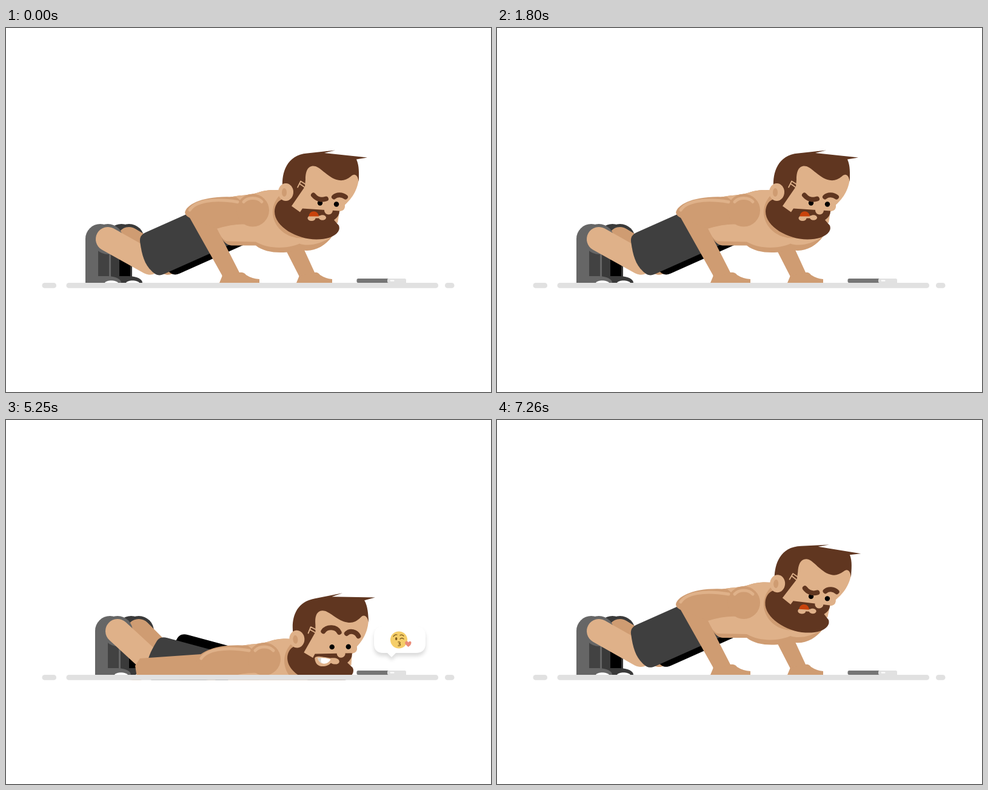
An HTML page with a canvas that plays this animation: 800 by 600 pixels, repeating every 7.29 s.

```html
<!DOCTYPE html>
<html lang="en">
<head>
<meta charset="utf-8">
<title>Push-ups</title>
<style>
html, body { margin: 0; width: 100%; height: 100%; overflow: hidden; background: #fff; }
canvas { display: block; width: 800px; height: 600px; }
</style>
</head>
<body>
<canvas id="stage" width="800" height="600"></canvas>
<script>
const c = document.getElementById('stage').getContext('2d');
const LOOP = 7290, STEP = 30;
const SKIN = '#dfb189', SHADE = '#cf9c72', HAIR = '#603620', GREY = '#e1e1e1';

const lerp = (a, b, k) => a + (b - a) * k;
const wave = x => (1 - Math.cos(Math.PI * x)) / 2;
const ramp = (t, a, b) => wave(Math.min(1, Math.max(0, (t - a) / (b - a))));
const pulse = (t, a, b, e, f) => ramp(t, a, b) - ramp(t, e, f);

// Eased value through [time, value] stops.
function track(t, stops) {
  let v = stops[0][1];
  for (let i = 1; i < stops.length; i++)
    v += (stops[i][1] - stops[i - 1][1]) * ramp(t, stops[i - 1][0], stops[i][0]);
  return v;
}

function fill(color, d) {
  c.fillStyle = color;
  c.fill(new Path2D(d));
}
function stroke(color, width, d) {
  c.strokeStyle = color;
  c.lineWidth = width;
  c.lineCap = c.lineJoin = 'round';
  c.stroke(new Path2D(d));
}
function oval(color, x, y, rx, ry = rx) {
  c.fillStyle = color;
  c.beginPath();
  c.ellipse(x, y, rx, ry, 0, 0, 7);
  c.fill();
}
function bar(color, x, y, w, h, r) {
  c.fillStyle = color;
  c.beginPath();
  c.roundRect(x, y, w, h, r);
  c.fill();
}
function at(x, y, deg, draw) {
  c.save();
  c.translate(x, y);
  c.rotate(deg * Math.PI / 180);
  draw();
  c.restore();
}

// up: push-up height, down: body on the floor, slide: limbs moved back
function poseAt(t) {
  let up;
  if (t < 2715) up = wave((t - 15) / 300);
  else if (t < 4000) up = 1 - ramp(t, 2715, 2985);
  else if (t < 5635) up = ramp(t, 5450, 5635);
  else up = wave((t - 5635) / 325 + 1);
  const nod = pulse(t, 4100, 4400, 5000, 5250) * Math.sin(t / 150) * 0.8;
  const down = pulse(t, 2715, 2985, 5450, 5635);
  const tilt = nod + track(t, [[2760, 0], [3030, 67], [3400, 67], [3850, -2],
    [4050, -6], [4350, -5], [5450, -5], [5635, 3.2]]);
  return {
    up, down, tilt,
    slide: pulse(t, 2715, 2985, 5350, 5635),
    prone: down * Math.min(1, Math.max(0, (tilt + 5) / 72)),
    joy: pulse(t, 3650, 3900, 5400, 5550),
    strain: pulse(t, 5400, 5550, 6750, 6950)
  };
}

function shoe(x, color, inner) {
  at(x, 0, 0, () => {
    oval(color, 24.5, 347.5, 24.5);
    fill(color, 'M0 420V347H42V420Z');
    fill(inner, 'M21 366H39V412H21Z');
    oval(color, 37, 348, 25);
    fill(color, 'M0 420V409H36C50 409 59 414 59 420Z');
    fill('#fff', 'M32 420C35 415 50 415 54 420Z');
  });
}

function lower(p) {
  const { up, down, slide } = p;
  const x = lerp(239 + 13 * up, 249, down), y = lerp(374 - 54 * up, 393, down);
  const angle = lerp(-24 - 12 * up, 15, down), shift = 16 * slide;
  const shorts = (color, dx, dy) => at(x + dx, y + dy, angle, () =>
    fill(color, 'M128 -37H8C-2 -37 -6 -33 -8 -26C-14 -5 -16 10 -10 25C-6 35 -2 38 8 38H140V-25Q138 -37 128 -37Z'));
  const leg = (color, ankle, knee) =>
    stroke(color, 40, `M${ankle + shift} 348L${x + knee} ${y + 13}`);

  shoe(166 + shift, '#3a3a3a', '#000');
  leg(SHADE, 203, 28);
  shorts('#000', 26 + 8 * down, -1 - 4 * down);
  shoe(131 + shift, '#666', '#424242');
  leg(SKIN, 168, -2);
  shorts('#3f3f3f', 0, 0);
}

function hand(p, d) {
  at(-170 * p.slide, 24 * p.slide, 0, () => fill(SHADE, d));
}

function backArm(p) {
  const { up, down, slide } = p;
  const x = 448 - 9.5 * up + 19 * slide, y = 340 - 95 * up + 93 * down;
  const wx = -60 * slide, wy = 30 * slide;
  fill(SHADE, `M${x} ${y}L${484 + wx} ${410 + wy}L${510 + wx} ${405 + wy}L${x + 32 - 6 * up} ${y}Z`);
  hand(p, 'M479 420L484 408L509 403Q514 402 518 407Q527 413 538 414V420Z');
}

function torso() {
  const back = 'M352 340L330 318C330 294 342 282 363 281C385 275 400 277 415 272C430 267 440 267 455 268L505 290L530 320L538 344';
  fill(SHADE, back + 'C525 362 505 371 485 366C465 372 430 374 412 359L372 359Q360 358 352 340Z');
  fill(SKIN, back + 'C520 357 498 361 484 356C465 364 435 366 412 353L364 352Q358 350 352 340Z');
  oval(SHADE, 488, 304, 48, 43);
}

function frontArm(p) {
  const { up, down, slide } = p;
  const sy = 301 - 76 * up, e = 295 + 22 * up;
  const bx = 348 + 10 * up, by = 331 - 30 * up;
  const wrist = (x, y, fx, fy) =>
    `L${lerp(x, fx, slide) - 19 * slide} ${lerp(y, fy, slide) - 93 * down}`;

  hand(p, 'M352 420L357 408L385 403Q392 402 396 407Q405 413 418 414V420Z');
  at(19 * slide, 93 * down, 0, () => {
    fill(SHADE, `M${bx} ${by}` + wrist(386, 405, 216, 424) + wrist(357, 410, 213, 405) +
      wrist(356, 407, 221, 393) + `L${e + 8 + 3 * up} ${313 - 20 * slide}L${e + 35} 295Z`);
    fill(SHADE, `M${e} 304C${e + 2} ${291 - 5 * up} ${325 + 8 * up} ${275 - 11 * up} 380 ${279 - 49 * up}
      L407 ${sy}L412 ${sy + 26}Q387 ${sy + 18 + 46 * up} ${bx} ${by}L${e + 8} 313Q${e} 309 ${e} 304Z`);
    oval(SHADE, 407, sy, 27);
    stroke(SKIN, 5, `M${303 + 20 * up} ${300 + 3 * up}C${312 + 10 * up} ${286 - 2 * up}
      ${340 + 8 * up} ${280 - 24 * up} ${382 - 5 * up} ${287 - 54 * up}`);
    at(407, sy, -26 * up, () => stroke(SKIN, 5, 'M-15 -14C-8 -22 8 -22 15 -14'));
  });
}

// Two brows as cubic curves, eight numbers each.
const BROWS = {
  calm: [507, 276, 512, 282, 520, 285, 528, 282, 541, 279, 546, 274, 555, 275, 560, 279],
  joy: [506, 262, 513, 254, 528, 256, 532, 266, 544, 269, 550, 264, 560, 267, 563, 275],
  strain: [506, 275, 512, 281, 520, 286, 530, 285, 544, 286, 551, 286, 557, 284, 562, 279]
};

function eyes(p) {
  const { joy, strain } = p;
  for (const [x, y] of [[518, 289], [545, 291]])
    oval('#000', x + 2 * strain, y - strain, 4.2 + 2 * strain, 4.2 - 2.7 * strain);
  const b = BROWS.calm.map((v, i) =>
    v + (BROWS.joy[i] - v) * joy + (BROWS.strain[i] - v) * strain);
  for (const i of [0, 8])
    stroke(HAIR, 8, `M${b[i]} ${b[i + 1]}C${b.slice(i + 2, i + 8).join(' ')}`);
}

function mouth(grin) {
  if (grin) {
    fill(SKIN, 'M488 305C490 300 500 304 514 307C523 307 528 309 528 314C527 319 519 319 514 315C508 321 488 324 488 305Z');
    fill('#fff', 'M493 305Q504 305 514 309C509 318 495 318 493 305Z');
    fill('#d8d3cc', 'M493 305L499 306Q496 311 500 315Q494 312 493 305Z');
  } else {
    oval(SKIN, 504, 314, 6.5, 4.5);
    oval(SKIN, 522, 313, 6, 4.3);
    fill(SKIN, 'M500 310H524V314H500Z');
    fill('#c9430c', 'M499.5 311C500 300 515 300 516 311Z');
  }
}

function head(p) {
  const { down, prone } = p;
  const x = 485 + down * lerp(1, 8.5, prone), y = 291 + down * lerp(-5, 4, prone);
  at(x, y, p.tilt, () => {
    c.translate(-485, -291);
    fill(SKIN, 'M470 225H576L582 248C580 270 568 284 559 292C559 299 554 302 550 303L547 322L470 310Z');
    fill(HAIR, `M456 262C455 240 462 210 497 207L543 202L525 206.5L596 214L578 217
      C583 228 582 240 582 254C580 241 574 240 569 245C560 252 553 254 541 249
      C525 241 517 228 507 228C497 228 494 238 494 250L493 262L471 294L485 304L489 298
      L550 302Q550 311 541 317L549 326Q551 331 548 336C542 345 528 349 512 349
      C480 349 443 328 443 303C443 295 447 286 455 283Z`);
    stroke(SKIN, 1.8, 'M481 263L486 253L494 258M484 257L494 264');
    oval(SKIN, 461.5, 271, 12.5, 14.5);
    oval(SHADE, 459, 271.5, 4, 7);
    oval(SKIN, 552, 295, 7);
    // The features turn towards the floor when he lies face down.
    c.translate(16 * prone, -4 * prone);
    mouth(p.joy + p.strain > 0.5);
    eyes(p);
    oval(SKIN, 532, 301, 7);
  });
}

function emoji(t) {
  const ink = '#7d5a1e';
  oval('#f5ce69', 648, 362.5, 14);
  oval(ink, 643.7, 360.5, 1.7, 2.5);
  stroke(ink, 1.2, 'M639 357Q641 353 645 354M650 355Q653 353 656 356M650 361Q653 358 656 361');
  stroke(ink, 1.3, 'M647 366C651 365 651 369 648 369C652 369 651 373 647 372');
  const s = 1 + 0.07 * Math.sin((t - 5250) / 110);
  c.translate(663.5, 369);
  c.scale(s, s);
  fill('#ea8b78', 'M0 5C-5 1 -6 -1 -5 -3C-3 -6 0 -4 0 -2C1 -5 5 -5 5 -2C5 1 3 3 0 5Z');
}

function bubble(t) {
  const s = track(t, [[3210, 0], [3390, 1.07], [3510, 1], [5470, 1], [5530, 1.06], [5650, 0]]);
  if (s < 0.01) return;
  at(636, 392, 0, () => {
    c.scale(s, s);
    c.translate(-636, -392);
    c.save();
    c.shadowColor = 'rgba(0,0,0,.15)';
    c.shadowBlur = 6;
    c.shadowOffsetY = 5;
    fill('#fff', 'M622 340H676Q692 340 692 356V368Q692 384 676 384H643L636 391L629 384H622Q607 384 607 368V356Q607 340 622 340Z');
    c.restore();
    emoji(t);
  });
}

function ground() {
  bar(GREY, 59.5, 420, 23.5, 8.7, 4.3);
  bar(GREY, 99.5, 420, 613.5, 8.7, 4.3);
  bar(GREY, 724, 420, 15.5, 8.7, 4.3);
  bar('#757575', 578.5, 413, 54, 7, [2.5, 0, 0, 2.5]);
  bar(GREY, 629, 413, 31, 7, [2, 2.5, 0, 2]);
  bar('#fff', 633.5, 415.6, 7, 1.8, 0.9);
}

function draw(t) {
  const p = poseAt(t);
  c.fillStyle = '#fff';
  c.fillRect(0, 0, 800, 600);
  c.save();
  c.beginPath();
  c.rect(0, 0, 800, 428.7);
  c.clip();
  lower(p);
  backArm(p);
  at(19 * p.slide, 93 * p.down - 76 * p.up, 0, () => {
    torso();
    head(p);
  });
  frontArm(p);
  c.restore();
  ground();
  bubble(t);
}

const start = performance.now();
function tick() {
  const t = (performance.now() - start) % LOOP;
  draw(Math.floor(t / STEP) * STEP);
  requestAnimationFrame(tick);
}
tick();
</script>
</body>
</html>
```
